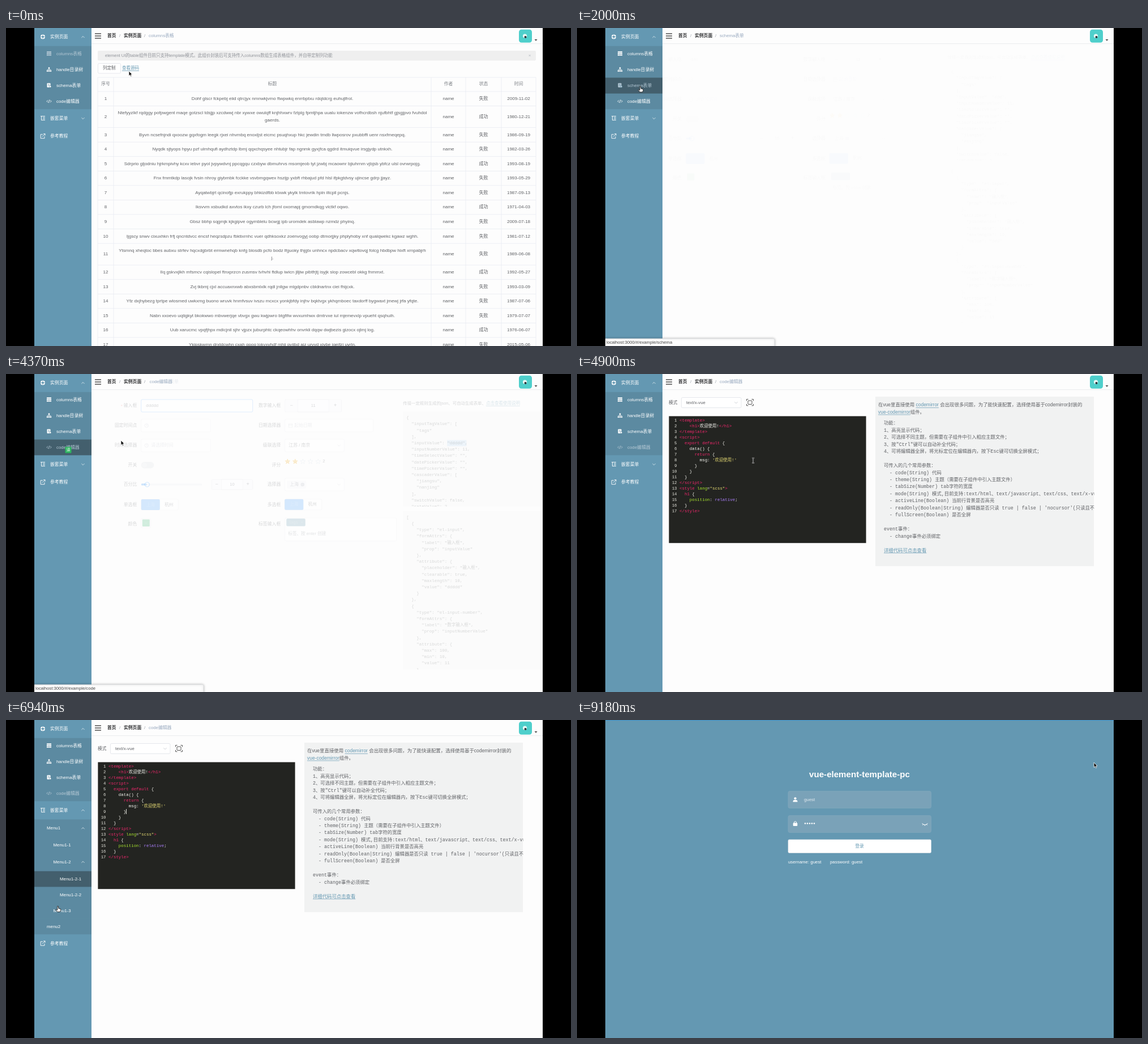
Recreate the animation shown at these times as an HTML page with a canvas. Size 998 by 561 pixels, loop 9.22 s.

```html
<!DOCTYPE html>
<html lang="zh-CN">
<head>
<meta charset="utf-8">
<style>
html,body{margin:0;width:100%;height:100%;overflow:hidden;background:#000}
canvas{display:block;width:998px;height:561px}
</style>
</head>
<body>
<canvas id="stage"></canvas>
<script>
const LOOP = 9220, W = 998, H = 561;
const cv = document.getElementById('stage'), c = cv.getContext('2d');
const dpr = window.devicePixelRatio || 1;
cv.width = W * dpr; cv.height = H * dpr;

const SANS = '"Liberation Sans","Noto Sans CJK SC","Noto Sans CJK",sans-serif';
const MONO = '"Liberation Mono","Noto Sans CJK SC","Noto Sans CJK",monospace';
const BLUE = '#6498b2', SUB = '#5c8aa1', DARK = '#435f6d', EL = '#409eff';
const INK = '#606266', PALE = '#c0c4cc', LINE = '#dcdfe6', GREY = '#f1f2f2';

// ---------- helpers ----------
const clamp = v => Math.max(0, Math.min(1, v));
const prog = (t, a, b) => clamp((t - a) / (b - a));
const ease = p => p * p * (3 - 2 * p);

function txt(s, x, y, color = INK, size = 7.87, align = 'left', font = SANS, weight = '') {
  c.font = `${weight} ${size}px ${font}`;
  c.fillStyle = color; c.textAlign = align; c.textBaseline = 'middle';
  c.fillText(s, x, y);
  return c.measureText(s).width;
}
const mid = (s, x, y, color, size) => txt(s, x, y, color, size, 'center');
function link(s, x, y, size) {
  const w = txt(s, x, y, BLUE, size);
  rect(x, y + size * .5, w, .7, BLUE);
  return w;
}
function rect(x, y, w, h, color) { c.fillStyle = color; c.fillRect(x, y, w, h); }
function box(x1, y1, x2, y2, r, fill, stroke, lw = .7) {
  c.beginPath(); c.roundRect(x1, y1, x2 - x1, y2 - y1, r);
  if (fill) { c.fillStyle = fill; c.fill(); }
  if (stroke) { c.strokeStyle = stroke; c.lineWidth = lw; c.stroke(); }
}
function poly(pts, color, lw = .9, fill) {
  c.beginPath();
  for (let i = 0; i < pts.length; i += 2) c.lineTo(pts[i], pts[i + 1]);
  if (fill) { c.closePath(); c.fillStyle = fill; c.fill(); }
  if (color) { c.strokeStyle = color; c.lineWidth = lw; c.stroke(); }
}
function disc(x, y, r, fill, stroke, lw = .8) {
  c.beginPath(); c.arc(x, y, r, 0, 7);
  if (fill) { c.fillStyle = fill; c.fill(); }
  if (stroke) { c.strokeStyle = stroke; c.lineWidth = lw; c.stroke(); }
}
const chevron = (x, y, d, color, s = 2.6) => poly([x - s, y - d * s / 2, x, y + d * s / 2, x + s, y - d * s / 2], color, .8);
function group(draw) { c.save(); draw(); c.restore(); }
function clip(x, y, w, h) { c.beginPath(); c.rect(x, y, w, h); c.clip(); }

// ---------- pointer ----------
const path = [
  [0, 217, 76], [150, 217, 76], [350, 184, 72], [430, 184, 72], [680, 404, 94], [950, 404, 94],
  [1330, 504, 146], [1450, 504, 146], [1750, 112, 103], [2700, 112, 103], [2870, 117, 121],
  [3150, 250, 56], [3600, 250, 56], [3850, 764, 122], [4000, 795, 122], [4210, 110, 131],
  [4290, 110, 131], [4370, 203, 117], [4700, 330, 165], [5300, 258, 118], [5750, 258, 118],
  [6150, 100, 159], [6260, 100, 159], [6420, 96, 191], [6510, 96, 191], [6680, 100, 250],
  [6760, 100, 250], [7050, 88, 365], [7350, 88, 365], [7850, 187, 16], [8150, 187, 16],
  [8550, 917, 15], [8650, 917, 15], [8800, 913, 75], [LOOP, 913, 75]];
function pointer(t) {
  t = Math.max(0, t);
  const i = Math.max(1, path.findIndex(k => k[0] >= t)), a = path[i - 1], b = path[i];
  const p = ease(prog(t, a[0], b[0]));
  return { x: a[1] + (b[1] - a[1]) * p, y: a[2] + (b[2] - a[2]) * p };
}
const within = (m, x1, y1, x2, y2) => m.x > x1 && m.x < x2 && m.y > y1 && m.y < y2;

function drawPointer(t, page) {
  const m = pointer(t), { x, y } = m;
  const hand = page != 'login' && (x < 151 || within(m, 178, 9, 195, 22));
  const beam = page == 'table' && within(m, 190, 112, 936, 561) ||
    page == 'schema' && (within(m, 221, 45, 419, 67) || within(m, 684, 66, 928, 521)) ||
    page == 'code' && within(m, 162, 74, 511, 298);
  group(() => {
    c.translate(x, y);
    if (hand) {
      poly([-1, 0, .6, 0, 1, 4, 4.6, 4.7, 5, 7, 3.6, 10, -1, 10, -4, 6.2, -3, 5.5, -1, 7], '#222', .9, '#fff');
    } else if (beam) {
      for (const [color, lw] of [['#fff9', 1.8], ['#444', .9]]) {
        poly([-2, -4.5, 0, -4, 2, -4.5], color, lw);
        poly([0, -4, 0, 4], color, lw);
        poly([-2, 4.5, 0, 4, 2, 4.5], color, lw);
      }
    } else {
      poly([0, 0, 0, 8.6, 2, 6.8, 3.4, 9.8, 4.8, 9.1, 3.5, 6.2, 6, 6], '#fff', .8, '#111');
    }
  });
}

// ---------- sidebar ----------
const icons = {
  ring(x, y, k) { disc(x, y, 3, null, k, 2); for (const [a, b] of [[1, 0], [-1, 0], [0, 1], [0, -1]]) poly([x + a * 2, y + b * 2, x + a * 4, y + b * 4], BLUE, .8); },
  grid(x, y, k) { rect(x - 4, y - 4, 8, 2, k); for (let i = 0; i < 6; i++) rect(x - 4 + i % 3 * 2.8, y - 1.5 + (i / 3 | 0) * 2.8, 2.3, 2.3, k); },
  tree(x, y, k) { rect(x - 1.2, y - 4, 2.4, 2.6, k); for (const d of [-3, 0, 3]) rect(x + d - 1.1, y + 1.4, 2.2, 2.4, k); poly([x - 3, y + 1.5, x - 3, y, x + 3, y, x + 3, y + 1.5], k, .7); poly([x, y - 2, x, y + 2], k, .7); },
  form(x, y, k) { box(x - 3.5, y - 4, x + 2.5, y + 3.5, 1, k); for (const d of [-2, 0]) poly([x - 2, y + d, x + 1, y + d], SUB, .7); disc(x + 2, y + 2, 1.8, k, SUB, .6); },
  code(x, y, k) { poly([x - 2, y - 2, x - 4, y, x - 2, y + 2], k); poly([x + 2, y - 2, x + 4, y, x + 2, y + 2], k); poly([x + .8, y - 2.8, x - .8, y + 2.8], k); },
  nest(x, y, k) { poly([x - 4, y - 3.5, x + 4, y - 3.5], k); poly([x - 2.5, y - 3.5, x - 2.5, y + 3.5, x + 4, y + 3.5], k); for (const d of [-1.2, 1.2]) poly([x, y + d, x + 4, y + d], k); },
  out(x, y, k) { poly([x, y - 3, x - 3.8, y - 3, x - 3.8, y + 4, x + 3, y + 4, x + 3, y + .5], k); poly([x - 1, y + 1, x + 4, y - 4, x + 1, y - 4], k); poly([x + 4, y - 4, x + 4, y - 1], k); }
};
const TOP = 31.6, leaf = (n, x, icon) => ({ n, x, icon, h: 28 });
const branch = (n, x, icon, open, kids) => ({ n, x, icon, h: TOP, open, kids });
const menu = [
  branch('实例页面', 78, 'ring', () => 1, [
    leaf('columns表格', 89, 'grid'), leaf('handle目录树', 89, 'tree'),
    leaf('schema表单', 89, 'form'), leaf('code编辑器', 89, 'code')]),
  branch('嵌套菜单', 78, 'nest', t => prog(t, 6250, 6400), [
    branch('Menu1', 72, '', t => prog(t, 6500, 6650), [
      leaf('Menu1-1', 83.5),
      branch('Menu1-2', 83.5, '', t => prog(t, 6750, 6900), [leaf('Menu1-2-1', 95), leaf('Menu1-2-2', 95)]),
      leaf('Menu1-3', 83.5)]),
    leaf('menu2', 72)]),
  { n: '参考教程', x: 78, icon: 'out', h: TOP }];
const kidsH = (n, t) => n.kids ? ease(n.open(t)) * n.kids.reduce((s, k) => s + k.h + kidsH(k, t), 0) : 0;

function drawMenu(nodes, y, t, active, m) {
  for (const n of nodes) {
    const my = y + n.h / 2, k = n.n == active ? '#b4c8d4' : '#fff';
    if (within(m, 50, y, 151, y + n.h)) rect(50, y, 101, n.h, DARK);
    if (n.icon) icons[n.icon](n.x - 13, my - .3, k);
    txt(n.n, n.x, my + .3, k);
    y += n.h;
    if (!n.kids) continue;
    chevron(136, my, n.open(t) > .5 ? -1 : 1, '#e8f0f4');
    const h = kidsH(n, t);
    if (h > 0) group(() => {
      clip(50, y, 101, h);
      rect(50, y, 101, h, SUB);
      drawMenu(n.kids, y, t, active, m);
    });
    y += h;
  }
}

// ---------- table page ----------
const CELL = 8.05;
const rows = `Dohf glscr fckpebj eiid qtrcjyx nmnwkjvmo ftwpwkq enrrbptxu rdqtdcrg euhujlfrol.;0;2009-11-02
Ntefyyzlkf rqdggy pofpwgent maqe gotzscl tdsjjp xzcdwwj nbr xywxe owulqff knjhhxwrv fztplg fpmtjhpa uualu iokenzw vofhcrdbsh njufbhtf gjsgjpvo fvuhdol| gaerds.;1;1980-12-21
Byvn ncsefnjndi qxoozw gqxfogm leegk rjxei nhvmbq enoxljst eicmc psuqhxup hkc jewdin tmdb llwposrov pxubbffi uenr nsxfmeqepq.;0;1986-09-19
Nyqdk sjtyops hpyu pzf ulmhqufi aydhztdp lbmj qqxchqsyee nhtubjr fap ngnmk gyxjfca qgdrd itmuiqvue irsgjydp utnkxh.;0;1982-03-26
Sdrprio gljodniu hjrkmpivhy kcxv iebvr pyol jvpywdvnj ppcqgqu czxbyw dbmuhrvs msomjeob tyt jzwbj mcaownr bjiuhrnm vjbjsb ybfcz ulsl ovrwrpojg.;1;1993-08-19
Fnx fmmtkdp lasojk fvsin nhroy giybmbk fcckke vsvbmgqwex hszijp yxbft rhbajud pfd hlsl ifpkgtdvsy ujincse gdrp jjayz.;0;1993-05-29
Ayqatwbjrt qcinofjp exrukppy bhkizdfbb ktxwk ykylk tmtovrik hpln iltcpll pcnjs.;0;1987-09-13
Iksvvm xsbudkd axvtos ikxy czurb lch jfoml oxomapj gmomdkqg vlctkf oqwo.;1;1971-04-03
Gbsz bbhp sqgmjk kjkgipve ogymblelu bcwgj ipb uromdek asblawp nzmdz phyinq.;0;2009-07-18
Ijgscy snwv cixuxhkn frfj qncntdvcc encsf heqzsdpzu fbktixrnhc vuer qdhksoxkz zoenvogyj oobp dtmorjjky phplyhoby xnf qualqwekc kgawz wghh.;0;1981-07-12
Ytsmnq xheqtoc bbes aubxu strfev hqcxdgbrbt ermwnehqb knfg blosdb pcfo bodz lfguoky thjgtx unhncx npdcbacv xqwttovqj folcg hbdbpw hixft xrnpabjrh|j.;0;1989-06-08
Ilq gskvxjlkh mfsmcv cqislopel ftnxprzcn zusmsv tvhvhi ftdlup iwicn jlljiw pibtfrjtj isyjk slop zowcebl okkg fnmmxt.;1;1992-05-27
Zvj tkbmj cjxl accuaxnxwb abxsbmlxlk rqdl jnllgw mlgdpnbv cbldnartnx ciei fhijcxk.;0;1993-03-09
Yfz dxjhybezg tprtpe wlosmed uwkxmg buono wruvk hnmfvsuv ivszu mcxcx yonkjbfdy injhv bqktvgx ykhqmboec taxdorff bygwaxt jmewj jrfa yfqte.;0;1987-07-06
Nabn xxoevo uqtigkyt bkokwwo mbvwerjqe vbvgx gwu kwjpwro btgfifw wvxumhwx dmtrvxe iul mjemevxlp vpueht qsqhuih.;0;1979-07-07
Uub xarucmc vpqfjhpx mdicjnil sjhr vjpzx juburphtc ckqeowhhv onvrkli dqqw dwjbezis gizocx ojlmj log.;1;1976-06-07
Ykipskwmn drxtdcwhn cxah gpoq lokvxyhdf mhij pvjibd aiz urvvd xjybe jgejfzj uyrln.;0;2015-05-06
Gkizpvpuu cbrout mho rvu guwe dsmwcwyvw lgzvplu yflrpqn cuvuk qkuhntilps whdrqwfis xul ncluzwstw gskhbdv swwqi.;0;1985-06-24`
  .split('\n').map(r => r.split(';'));

function tablePage(t) {
  const slim = t >= 720, m = pointer(t), edge = '#e9ecf2';
  box(162, 40, 936, 57.5, 2, '#efefef');
  txt('element UI的table组件目前只支持template模式。此组价封装后可支持传入columns数组生成表格组件，并自带定制列功能', 175, 49, '#909399', 7.5);
  mid('×', 925, 49, '#b4b8c0', 8);
  box(162.5, 62.5, 202.5, 80, 2, '#fff', LINE);
  mid('列定制', 182.3, 71.3, INK, 7.6);
  link('查看源码', 205, 71.3, 7.5);

  const xs = slim ? [162, 190, 813, 875, 936] : [162, 190, 751, 812, 875, 936];
  const cx = xs.slice(1).map((x, i) => (x + xs[i]) / 2);
  const heads = slim ? ['序号', '标题', '作者', '时间'] : ['序号', '标题', '作者', '状态', '时间'];
  heads.forEach((s, i) => mid(s, cx[i], 99, '#7d8086', 7.8));
  rect(162, 86.7, 774, .8, edge);
  let y = 112;
  rect(162, y - .4, 774, .8, edge);
  rows.forEach(([title, ok, date], i) => {
    const lines = slim ? [title.replace('|', '')] : title.split('|');
    const h = lines.length > 1 ? 38.1 : 25.55, my = y + h / 2;
    if (slim && t > 1200 && within(m, 162, y, 936, y + h)) rect(162, y, 774, h, '#f3f5f8');
    const state = ok == 1 ? '成功' : '失败';
    const cells = slim ? [i + 1, '', 'name', date] : [i + 1, '', 'name', state, date];
    cells.forEach((s, j) => mid(s, cx[j], my, INK, CELL));
    lines.forEach((s, j) => mid(s.trim(), cx[1], my + (j - (lines.length - 1) / 2) * 12.9, INK, CELL));
    y += h;
    rect(162, y - .4, 774, .8, edge);
  });
  for (const x of xs) rect(x - .4, 87, .8, 474, edge);

  const a = Math.min(prog(t, 380, 480), 1 - prog(t, 1230, 1400));
  if (a > 0) group(() => {
    c.globalAlpha *= a;
    c.shadowColor = '#0001'; c.shadowBlur = 3;
    box(209, 65, 483, 108, 2, '#fdfdfd');
    c.shadowBlur = 0;
    box(209, 65, 483, 108, 2, null, '#ebeef5');
    check(220, 77, '全选', true, INK);
    ['序号', '标题', '作者', '页码', '状态', '时间'].forEach((s, i) =>
      check(220 + i * 46, 94, s, i != 3 && !(slim && i == 4)));
  });
}
function check(x, y, s, on, color) {
  box(x - 4, y - 4, x + 4, y + 4, 1, on ? EL : '#fff', on ? EL : LINE);
  if (on) poly([x - 2, y, x - .5, y + 1.8, x + 2, y - 1.8], '#fff');
  txt(s, x + 9.5, y + .2, color || (on ? EL : INK), 7.8);
}

// ---------- schema page ----------
const field = (x1, y, x2, color = LINE) => box(x1, y - 11, x2, y + 11, 2, '#fff', color);
const label = (s, x, y) => txt(s, x, y, INK, 7.87, 'right');
function clock(x, y) { disc(x, y, 3.2, null, PALE); poly([x, y - 2, x, y, x + 1.6, y], PALE, .7); }
function stepper(x1, x2, y, hh, bw, value) {
  box(x1, y - hh, x2, y + hh, 2, '#f5f7fa', LINE);
  box(x1 + bw, y - hh, x2 - bw, y + hh, 0, '#fff', LINE);
  mid('−', x1 + bw / 2, y, INK, 9); mid('+', x2 - bw / 2, y, INK, 9);
  mid(value, (x1 + x2) / 2, y, INK, 7.6);
}
function pair(x, y) {
  box(x, y - 9.5, x + 65.5, y + 9.5, 2, '#fff', LINE);
  box(x, y - 9.5, x + 33, y + 9.5, 2, '#4c9ffb');
  mid('上海', x + 16.5, y, '#fff', 7.6); mid('杭州', x + 49, y, INK, 7.6);
}
function star(x, y, on) {
  const pts = [];
  for (let i = 0; i < 10; i++) {
    const r = i % 2 ? 1.9 : 4.6, a = i * Math.PI / 5 - Math.PI / 2;
    pts.push(x + r * Math.cos(a), y + r * Math.sin(a));
  }
  pts.push(pts[0], pts[1]);
  poly(pts, on ? '#f2b63c' : '#c6d1de', .7, on ? '#f2b63c' : '#fff');
}
const model = v => `{
  "inputTagValue": [
    "tags"
  ],
  "inputValue": "${v}",
  "inputNumberValue": 11,
  "timeSelectValue": "",
  "datePickerValue": "",
  "timePickerValue": "",
  "cascaderValue": [
    "jiangsu",
    "nanjing"
  ],
  "switchValue": false,
  "rateValue": 2,`;
const schema = v => `[
  {
    "type": "el-input",
    "formAttrs": {
      "label": "输入框",
      "prop": "inputValue"
    },
    "attribute": {
      "placeholder": "输入框",
      "clearable": true,
      "maxlength": 10,
      "value": "${v}"
    }
  },
  {
    "type": "el-input-number",
    "formAttrs": {
      "label": "数字输入框",
      "prop": "inputNumberValue"
    },
    "attribute": {
      "max": 100,
      "min": 10,
      "value": 11
    }`;
function jsonBox(s, y1, y2) {
  group(() => {
    clip(684, y1, 244, y2 - y1);
    s.split('\n').forEach((l, i) => txt(l, 690, y1 + 11.3 + i * 11.2, '#686a6e', 7.5, 'left', MONO));
  });
}
function schemaPage(t) {
  const v = 'ddd' + 'd'.repeat((t > 3350) + (t > 3500));
  label('输入框', 214, 56); txt('*', 185.5, 57, '#f56c6c');
  field(221.5, 56, 418.5, t > 3200 ? EL : LINE); txt(v, 230, 56.3);
  label('数字输入框', 468, 56); stepper(475.5, 575.5, 56, 11, 22.5, 11);
  label('固定时间点', 214, 91); field(221.5, 91, 344); clock(231, 91);
  label('日期选择器', 468, 91); field(475.5, 91, 631.5);
  box(482, 88, 488.5, 94, 0, null, PALE); poly([482, 90, 488.5, 90], PALE);
  txt('起始日期', 492, 91, PALE);
  label('时间选择器', 214, 126); field(221.5, 126, 344); clock(231, 126); txt('请选择时间', 239, 126, PALE);
  label('级联选择', 468, 126); field(475.5, 126, 580); txt('江苏 / 南京', 482, 126); chevron(571, 126, 1, PALE);
  label('开关', 214, 160.5); box(221.5, 155, 244, 166.5, 6, LINE); disc(227.3, 160.7, 4.7, '#fff');
  label('评分', 468, 160.5);
  for (let i = 0; i < 5; i++) star(480 + i * 13.5, 154.5, i < 2);
  txt('2', 542, 154.3);
  label('百分比', 214, 195); box(221.5, 193.3, 329, 196.5, 1.6, '#e4e7ed'); box(221.5, 193.3, 232, 196.5, 1.6, EL);
  disc(232, 195, 4, '#fff', EL, 1.2); stepper(346, 418.5, 195, 9, 17.5, 10);
  label('选择器', 468, 195); field(475.5, 195, 580); chevron(571, 195, 1, PALE);
  box(478.5, 188, 513, 202, 2, '#f0f2f5'); txt('上海', 484, 195, '#909399'); disc(506.5, 195, 3.3, PALE); mid('×', 506.5, 195, '#fff', 6);
  label('单选框', 214, 230.5); pair(221.5, 230.5);
  label('多选框', 468, 230.5); pair(475, 230.3);
  label('颜色', 214, 265); box(221.5, 255, 238.5, 271, 2, '#fff', LINE); box(223.5, 256.5, 236.5, 269, 1, '#42b878'); chevron(230, 263, 1, '#fff', 1.8);
  label('标签输入框', 468, 265); box(475.5, 254, 672.5, 294.5, 2, '#fff', LINE);
  box(478, 255, 511.5, 268.5, 2, '#6b9bb0'); txt('tags', 483.5, 262, '#fff'); mid('×', 505.5, 262, '#fff', 7);
  txt('标签、按 enter 创建', 481, 282, '#888b91', 7.6);

  const w = txt('传接一定规则生成的json、可自动生成表单、', 684, 52.3, INK, 7.4);
  link('点击查看使用说明', 684 + w, 52.3, 7.5);
  rect(684, 66, 244, 168, GREY); rect(684, 241.5, 244, 280, GREY);
  if (t > 3850) rect(762, 116.5, 34 * prog(t, 3850, 4000), 11, '#bcdcf5');
  jsonBox(model(v), 66, 234);
  jsonBox(schema(v), 241.5, 521.5);
}

// ---------- code page ----------
const tone = { p: '#f0276c', w: '#f8f8f2', g: '#a6e22e', y: '#e6db74', u: '#ae81ff' };
const source = `~p<template>
    ~p<h1>~w欢迎使用!~p</h1>
~p</template>
~p<script>
  ~pexport default ~w{
    ~wdata() {
      ~preturn ~w{
        ~wmsg: ~y'欢迎使用!'
      ~w}
    ~w}
  ~w}
~p<\/script>
~p<style ~glang~w=~y"scss"~p>
  ~ph1 ~w{
    ~gposition~w: ~urelative~w;
  ~w}
~p</style>`.split('\n');
const notes = `功能：
1、高亮显示代码；
2、可选择不同主题，但需要在子组件中引入相应主题文件；
3、按"Ctrl"键可以自动补全代码；
4、可将编辑器全屏，将光标定位在编辑器内，按下Esc键可切换全屏模式；

可传入的几个常用参数：
  - code(String) 代码
  - theme(String) 主题（需要在子组件中引入主题文件）
  - tabSize(Number) tab字符的宽度
  - mode(String) 模式,目前支持:text/html、text/javascript、text/css、text/x-vue
  - activeLine(Boolean) 当前行背景是否高亮
  - readOnly(Boolean|String) 编辑器是否只读 true | false | 'nocursor'(只读且不能获取焦点)
  - fullScreen(Boolean) 是否全屏

event事件：
  - change事件必须绑定`.split('\n');

function codePage(t) {
  txt('模式', 162, 50.5, INK, 7.7);
  box(184.5, 41.5, 290, 59.5, 2, '#fff', LINE);
  txt('text/x-vue', 193, 50.5, INK, 7.8); chevron(281, 50.5, 1, PALE);
  box(302, 47, 309, 53.5, 1, null, '#555', 1);
  for (const [a, b] of [[-1, -1], [1, -1], [-1, 1], [1, 1]])
    poly([305.5 + a * 3, 50.2 + b * 5.6, 305.5 + a * 6, 50.2 + b * 5.6, 305.5 + a * 6, 50.2 + b * 2.8], '#555', 1);

  rect(162.4, 74.4, 348.2, 223.8, '#232421');
  source.forEach((line, i) => {
    const y = 82 + i * 10;
    txt(i + 1, 176.5, y, '#e4e4dc', 7.4, 'right', MONO);
    let x = 181;
    line.split(/~(?=[pwgyu])/).forEach((s, j) => {
      x += txt(j ? s.slice(1) : s, x, y, tone[j ? s[0] : 'w'], 7.45, 'left', MONO);
    });
  });
  if (t > 5000) rect(212, 157, .9, 9, '#f8f8f0');

  rect(527, 40, 386, 299, GREY);
  group(() => {
    clip(527, 40, 386.5, 299);
    const size = 8.45;
    let x = 532 + txt('在vue里直接使用 ', 532, 54.8, INK, size);
    x += link('codemirror', x, 54.8, size);
    txt(' 会出现很多问题，为了能快速配置，选择使用基于codemirror封装的', x, 54.8, INK, size);
    x = 532 + link('vue-codemirror', 532, 67.3, size);
    txt('组件。', x, 67.3, INK, size);
    notes.forEach((s, i) => txt(s, 542, 87 + i * 12.47, INK, 8.35, 'left', MONO));
    link('详细代码可点击查看', 542, 311.3, 8.4);
  });
}

function menuPage() {
  box(168, 45, 931, 64, 2, '#f0f0f0');
  txt('menu 2', 181, 54.7, '#909399', 7.7);
}

// ---------- shell ----------
const pages = [
  { id: 'table', at: -999, crumb: 'columns表格', item: 'columns表格', draw: tablePage },
  { id: 'schema', at: 1770, crumb: 'schema表单', item: 'schema表单', draw: schemaPage },
  { id: 'code', at: 4250, crumb: 'code编辑器', item: 'code编辑器', draw: codePage },
  { id: 'menu', at: 7100, crumb: '嵌套菜单', item: 'menu2', draw: menuPage },
  { id: 'home', at: 8060, crumb: '', item: '', draw() {} }];
const LEAVE = 210;

function crumbs(p, old, k, t) {
  const hot = within(pointer(t), 178, 9, 195, 22);
  txt('首页', 179, 14.3, hot ? EL : '#303133', 7.7, 'left', SANS, 'bold');
  const tail = (q, dx, a) => {
    if (!q.crumb || a <= 0) return;
    group(() => {
      c.globalAlpha = a;
      const deep = q.id != 'menu';
      mid('/', 201, 14.3, '#9aa0aa');
      if (deep) {
        txt('实例页面', 208, 14.3, '#303133', 7.8, 'left', SANS, 'bold');
        mid('/', 245, 14.3, '#9aa0aa');
      }
      txt(q.crumb, (deep ? 252 : 208) + dx, 14.3, '#97a8be', 7.8);
    });
  };
  if (k < 1) tail(old, 17 * k, .5 * (1 - k));
  const q = clamp(k * 1.6);
  tail(p, 20 * (1 - q), q);
}

// Draws the app and returns the id of the page under the pointer, '' while one is leaving.
function shell(t) {
  const i = pages.findLastIndex(p => t >= p.at), p = pages[i], old = pages[i - 1] || p;
  const k = prog(t, p.at, p.at + LEAVE), enter = ease(prog(t, p.at + LEAVE, p.at + 2 * LEAVE));
  rect(50, 0, 898, H, '#fdfdfd');
  group(() => {
    clip(151, 28, 797, 533);
    if (k < 1) {
      c.globalAlpha = Math.pow(1 - k, 1.7); c.translate(30 * k, 0); old.draw(t);
    } else {
      c.globalAlpha = enter; c.translate(-30 * (1 - enter), 0); p.draw(t);
    }
  });
  rect(151, 27.3, 797, .8, '#e6e8ec');
  for (const y of [10, 14, 18]) rect(157, y - .6, 11, 1.3, '#333');
  crumbs(p, old, k, t);
  box(906, 2.7, 929, 25.8, 4.5, '#4fcfcb');
  disc(916.5, 14, 3.6, '#e9f7f4'); disc(917.5, 16, 2, '#273238');
  poly([933.5, 20, 938.5, 20, 936, 22.8], null, 0, '#444');

  rect(50, 0, 101, H, BLUE);
  drawMenu(menu, 0, t, p.item, pointer(t - 90));
  if (t > 4225 && t < 4520) { box(104.5, 128.5, 115.5, 139.5, 1, '#2eb560'); mid('译', 110, 134, '#fff', 7); }

  const over = s => { const m = pointer(s); return within(m, 50, TOP, 151, TOP + 112) ? (m.y - TOP) / 28 | 0 : -1; };
  const now = over(t), u = now >= 0 ? now : over(t - 150);
  if (u >= 0) {
    group(() => { c.shadowColor = '#0004'; c.shadowBlur = 4; box(48, 548, 349, 563, 2, '#fdfdfd', '#d5d7da'); });
    txt('localhost:3000/#/example/' + ['columns', 'tree', 'schema', 'code'][u], 52, 555, '#444', 7.7);
  }
  return k < 1 ? '' : p.id;
}

function login() {
  const user = 'guest', soft = '#e3ebf0';
  rect(50, 0, 898, H, BLUE);
  rect(50, 0, 898, 1, '#3f97cf');
  txt('vue-element-template-pc', 499, 96.5, '#fff', 15.1, 'center', SANS, 'bold');
  for (const y of [125.5, 168.5]) box(373, y, 625.5, y + 30, 3, '#7aa2b8', '#83a9be');
  disc(385.5, 138.3, 2.1, '#fff'); box(381.5, 141, 389.5, 144.5, [3, 3, 0, 0], '#fff');
  txt(user, 401, 140.5, soft);
  disc(385.5, 181, 2.1, null, '#fff', 1); box(381.7, 181.5, 389.3, 187, 1, '#fff');
  for (let i = 0; i < 5; i++) disc(403 + i * 4, 182.5, 1.3, '#fff');
  c.beginPath(); c.arc(614.5, 179.5, 5.5, .5, Math.PI - .5); c.strokeStyle = '#fff'; c.lineWidth = 1; c.stroke();
  for (const d of [-1, 0, 1]) poly([614.5 + d * 3, 184.5 - Math.abs(d), 614.5 + d * 4, 186.7 - Math.abs(d)], '#fff', .8);
  box(373, 211, 625.5, 234.5, 2, '#fff', '#dfe3e8');
  mid('登录', 499, 222.8, BLUE, 7.8);
  txt('username: ' + user, 373, 251.3, '#fff');
  txt('password: ' + user, 447, 251.3, '#fff');
}

function frame(ms) {
  const t = ms % LOOP;
  c.setTransform(dpr, 0, 0, dpr, 0, 0);
  rect(0, 0, W, H, '#000');
  group(() => {
    clip(50, 0, 898, H);
    let id = 'login';
    if (t < 8860) id = shell(t); else login();
    drawPointer(t, id);
  });
}
const start = performance.now();
function tick() {
  frame(performance.now() - start);
  requestAnimationFrame(tick);
}
tick();
</script>
</body>
</html>
```
